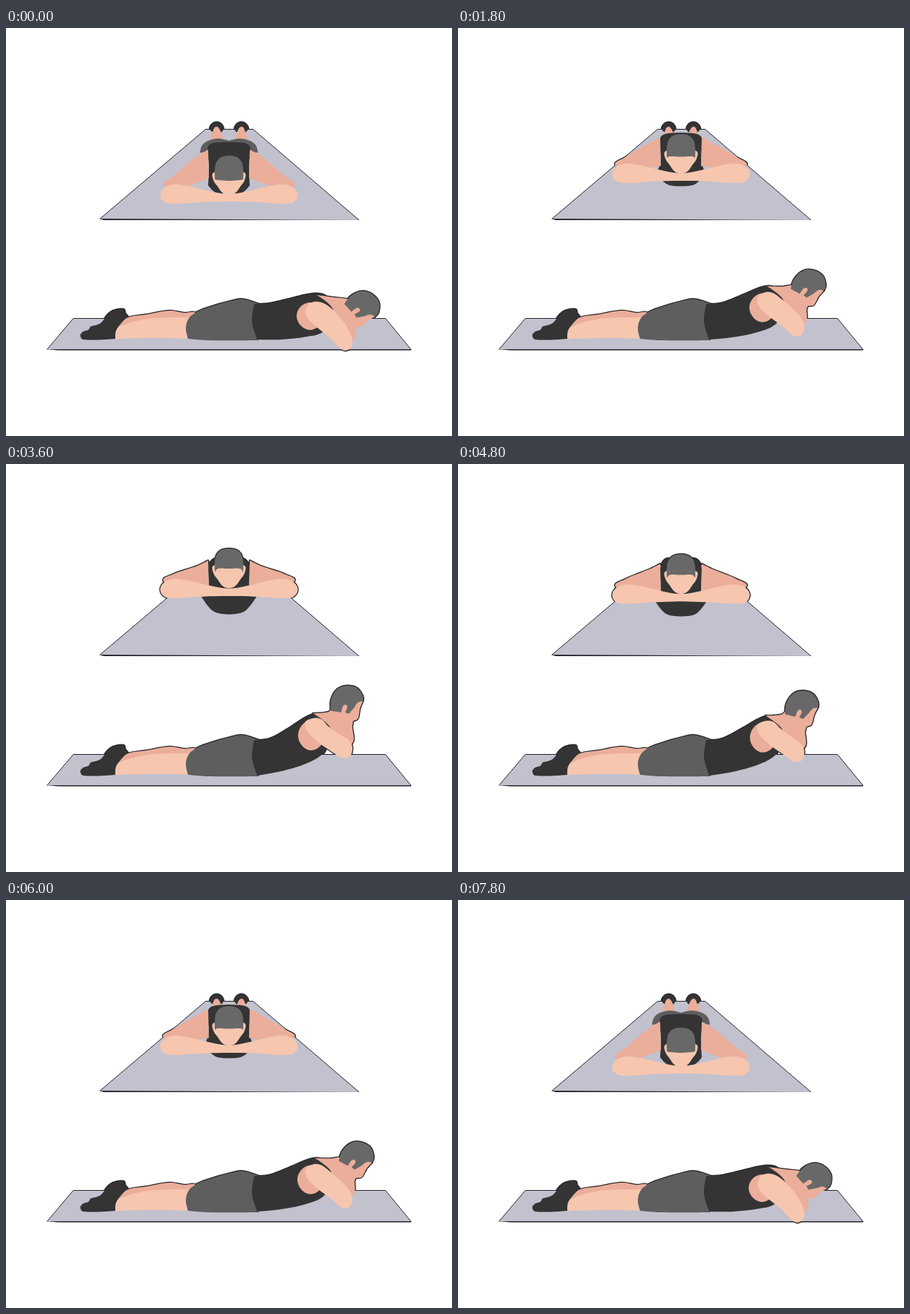
Write an HTML page with a canvas that moves like this. It is 600 px wide and 550 px high and loops after 8400 ms.

```html
<!DOCTYPE html>
<html lang="en">
<head>
<meta charset="utf-8">
<title>Prone chest lift</title>
<style>
  html, body { margin: 0; height: 100%; overflow: hidden; background: #fff; }
  canvas { display: block; width: 600px; height: 550px; }
</style>
</head>
<body>
<canvas></canvas>
<script>
const DARK = '#343434', SHORTS = '#5e5e5e', HAIR = '#686868';
const LIGHT = '#f6c6af', TAN = '#ebae9a', MAT = '#c2c1ce', LINE = '#26262c';

// Key points are "x y" or "x y dx dy", where dx dy is the travel to the full lift.
// "!" marks a sharp corner; rise is the travel of points that name none.
// Modes: fold = left half completed by its mirror image, pair = drawn twice,
// head = relative to the centre of the turning head.
const front = [
  { fill: DARK, mode: 'pair', points: '275 138,276 131,283 127,290 130,292 138,284 142' },
  { fill: TAN, mode: 'pair', points: '278 140,283 133,289 140,292 152!,274 152!' },
  { fill: SHORTS, mode: 'fold',
    points: '300 152!,286 149 0 10,272 152 6 10,264 158 10 5,261 168! 14 0,290 167' },
  { fill: DARK, mode: 'fold',
    points: '290 154 -4 -25,276 156 -2 -23,271 163 1 -23,273 185 -1 -13,272 212! -9 -33,278 219 -1 -22,285 223 5 -21' },
  { fill: TAN, mode: 'pair',
    points: '272 164! 0 -34,258 172 0 -35,243 184 0 -42,226 199 0 -51,212 213 0 -55,240 214 0 -46,258 208 0 -39,273 202! 0 -32' },
  { fill: LIGHT, mode: 'fold', rise: -56,
    points: '290 223,262 217,240 212,220 212,208 222,212 234,228 237,258 235,290 234' },
  { fill: LIGHT, mode: 'fold', rise: -58,
    points: '290 197,279 195,279 205,285 214,291 222,297 225' },
  { fill: HAIR, mode: 'fold', rise: -58,
    points: '292 173,284 179,281 189,281 204!,285 205 0 -64,298 206 0 -65' }
];

const side = [
  { fill: TAN, points: '150 403,162 391,190 386,220 381,240 384,256 385,250 397!,190 397' },
  { fill: LIGHT, points: '148 408,154 402,175 395,200 391,250 390!,250 419!,200 418,148 419!' },
  { fill: DARK,
    points: '100 414,104 409!,111 407!,114 402!,127 398,137 386,144 381,158 379,160 384!,164 389!,155 398,148 408,147 419!,104 420' },
  { fill: SHORTS,
    points: '244 395,250 387,265 379,310 366,322 366,340 372!,340 421!,270 421,245 419!,242 406' },
  { fill: DARK,
    points: '338 420!,331 396,334 372!,355 371 0 -1,385 364 -3 -9,413 358 -7 -18,430 361 -11 -24,440 375 -3 -23,436 395 -4 -17,426 410 2 -21,405 416 3 -14,370 420 5 -7' },
  { fill: TAN,
    points: '418 360! -5 -24,440 363 -6 -29,462 366 -22 -38,480 375 -20 -40,472 396 -6 -40,466 420 -2 -42,446 400 -4 -30,438 376 -4 -24' },
  { fill: TAN, mode: 'head', points: '22 1!,18 11,17 17,15 25,9 28,7 34,-6 30,-10 10' },
  { fill: TAN, points: '391 388 2 -22,409 370 2 -25,427 388 2 -23,409 407 2 -21' },
  { fill: LIGHT,
    points: '403 383 -1 -33,408 372 4 -29,420 369 4 -25,434 375 0 -21,451 392 -3 -28,463 411 -2 -39,466 426 0 -44,460 434 2 -39,451 433 1 -37,436 418 4 -29,408 394 4 -26' },
  { fill: HAIR, mode: 'head',
    points: '-21 14!,-21 -1,-13 -15,0 -20,14 -17,22 -6,22 1!,15 3,10 10,3 18!,-2 16!,1 8,-3 6,-6 11,-7 16!' }
];

const rad = Math.PI / 180;

// The head swings around the waist while levelling its gaze.
function placeHead(p, lift) {
  const swing = (10 + 23.4 * lift) * rad, tilt = 39 * (1 - lift) * rad;
  const c = Math.cos(tilt), s = Math.sin(tilt);
  return {
    x: 335 + 147.5 * Math.cos(swing) + p.x * c - p.y * s,
    y: 400 - 147.5 * Math.sin(swing) + p.x * s + p.y * c,
    sharp: p.sharp
  };
}

function pose({ mode, rise = 0, points }, lift) {
  return points.split(',').map(text => {
    const [x, y, dx = 0, dy = rise] = text.split(' ').map(parseFloat);
    const p = { x: x + dx * lift, y: y + dy * lift, sharp: text.includes('!') };
    return mode === 'head' ? placeHead(p, lift) : p;
  });
}

// Closed smooth curve whose handles follow the neighbouring points.
function curve(pts) {
  const n = pts.length, at = i => pts[(i + n) % n];
  const handle = (i, len) => {
    const p = at(i), a = at(i - 1), b = at(i + 1);
    const k = p.sharp ? 0 : len * 0.36 / (Math.hypot(b.x - a.x, b.y - a.y) || 1);
    return [p.x + (b.x - a.x) * k, p.y + (b.y - a.y) * k];
  };
  const path = new Path2D();
  path.moveTo(pts[0].x, pts[0].y);
  for (let i = 0; i < n; i++) {
    const p = at(i), q = at(i + 1), len = Math.hypot(q.x - p.x, q.y - p.y);
    path.bezierCurveTo(...handle(i, len), ...handle(i + 1, -len), q.x, q.y);
  }
  path.closePath();
  return path;
}

function build(parts, lift) {
  return parts.map(part => {
    const pts = pose(part, lift);
    const mirror = pts.map(p => ({ ...p, x: 600 - p.x })).reverse();
    const path = curve(part.mode === 'fold' ? pts.concat(mirror) : pts);
    if (part.mode === 'pair') path.addPath(curve(mirror));
    return { fill: part.fill, path };
  });
}

const canvas = document.querySelector('canvas'), ctx = canvas.getContext('2d');
const ratio = window.devicePixelRatio || 1;
canvas.width = 600 * ratio;
canvas.height = 550 * ratio;
ctx.scale(ratio, ratio);

const frontMat = new Path2D('M126 257.5L268.5 136.5H332.5L475 259');
const frontEdge = new Path2D('M126 257L475 259H131Z');
const sideMat = new Path2D('M55 433.5L90.5 391.5H510.5L545 433.5');
const sideEdge = new Path2D('M55 433H545V434.5H70Z');

function fill(path, color) {
  ctx.fillStyle = color;
  ctx.fill(path);
}

function outline(path, width) {
  ctx.lineWidth = width;
  ctx.stroke(path);
}

// The outline goes beneath the mat, so it only shows against white.
function scene(shapes, mat, edge) {
  ctx.strokeStyle = LINE;
  ctx.lineJoin = 'round';
  shapes.forEach(s => outline(s.path, 2.6));
  fill(mat, MAT);
  outline(mat, 1);
  fill(edge, LINE);
  shapes.forEach(s => fill(s.path, s.fill));
}

// Six steps up and six down, with a double hold at both ends.
function draw(time) {
  const step = Math.floor(time % 8400 / 600);
  const u = Math.min(step, 13 - step) / 6;
  const lift = u - 0.04 * Math.sin(2 * Math.PI * u);
  ctx.clearRect(0, 0, 600, 550);
  scene(build(front, lift), frontMat, frontEdge);
  scene(build(side, lift), sideMat, sideEdge);
}

function frame() {
  draw(performance.now());
  requestAnimationFrame(frame);
}
frame();
</script>
</body>
</html>
```
